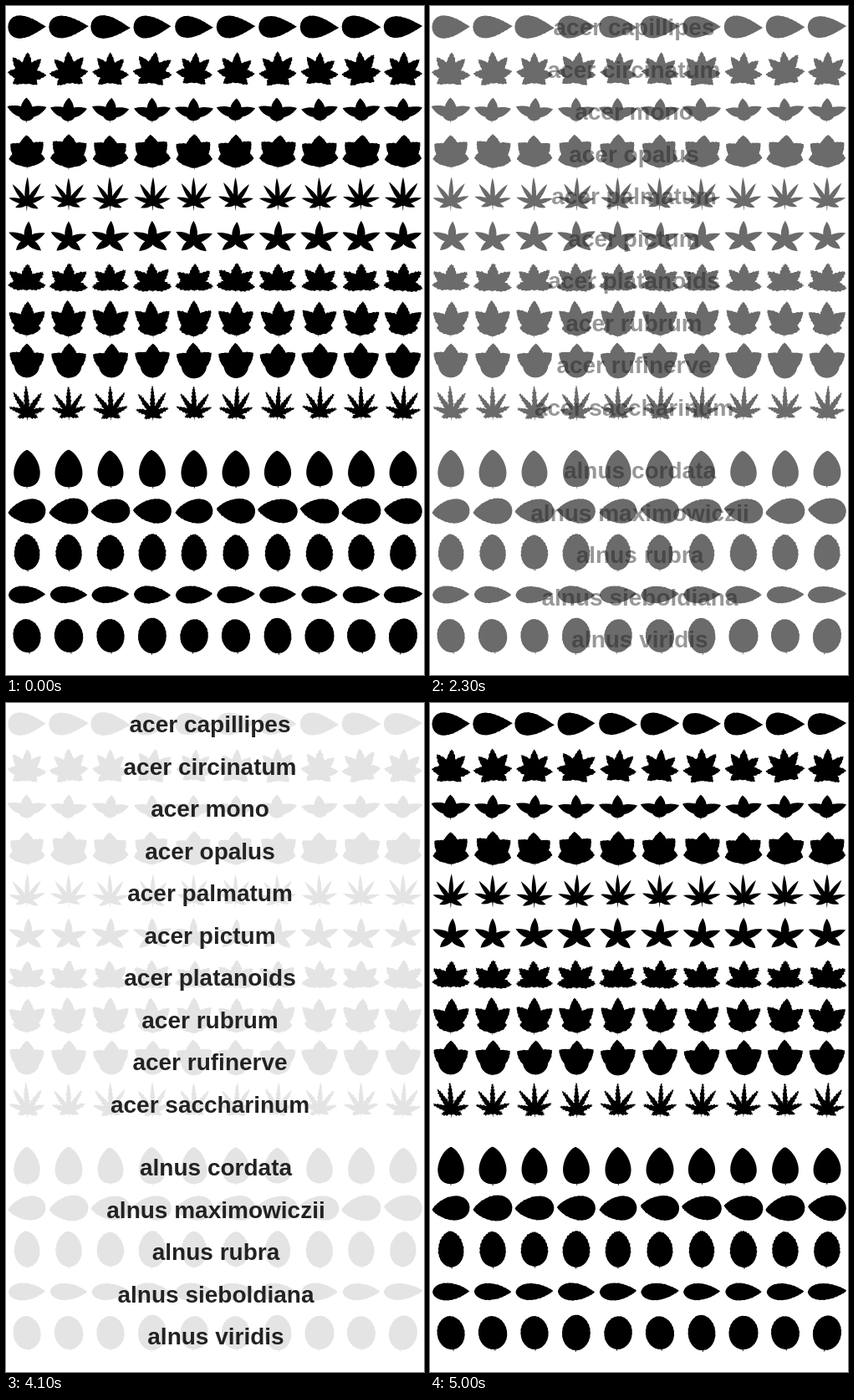
Animation of 500x800 px, one loop 6 s. Source, as an HTML page:

```html
<!DOCTYPE html>
<html lang="en">
<head>
<meta charset="utf-8">
<title>Leaf shapes</title>
<style>
  html, body { margin: 0; width: 100%; height: 100%; overflow: hidden; background: #fff; }
  svg { display: block; width: 100%; height: 100%; }
  text { font: bold 28px "Liberation Sans", Arial, sans-serif; fill: #222; text-anchor: middle; }
</style>
</head>
<body>
<svg viewBox="0 0 500 800">
  <path id="leaves"/>
  <g id="names" opacity="0"></g>
</svg>
<script>
const leaves = document.getElementById('leaves');
const names = document.getElementById('names');
let path = '';

let seed = 7;
const random = () => (seed = (seed * 16807) % 2147483647) / 2147483647;
const vary = size => (random() * 2 - 1) * size;

function turn([x, y], degrees) {
  const a = degrees * Math.PI / 180, cos = Math.cos(a), sin = Math.sin(a);
  return [x * cos - y * sin, x * sin + y * cos];
}

// A blade grows from its foot; its half width follows t^tip * (1 - t)^base, t = 0 at the tip.
function blade({ angle = 0, length, width, tip = .9, base = .5, teeth = 0, foot = 0 }) {
  const n = Math.max(10, Math.round(length * .6));
  const profile = t => t ** tip * (1 - t) ** base;
  const peak = profile(tip / (tip + base));
  const side = sign => Array.from({ length: n + 1 }, (_, k) => {
    const t = (1 - Math.cos(Math.PI * k / n)) / 2;
    const tooth = k % 2 && k < n ? teeth * (.5 + random()) : 0;
    const half = width / 2 * profile(t) / peak + tooth;
    return turn([sign * half, foot - (1 - t) * length - tooth], angle);
  });
  return [...side(1), ...side(-1).reverse()];
}

const disc = radius =>
  blade({ length: 2 * radius, width: 2 * radius, tip: .5, foot: radius });

// A leaf is a middle blade with pairs of side lobes, a round body and a stem.
function leaf(cx, cy, style) {
  const { w, h, facing = 0, sway = 3, pairs = 0, spread = 0, top = h, last = top,
          body = 0, stem = 0, lobe = w, tip, base, teeth } = style;
  const parts = [];
  for (let i = -pairs; i <= pairs; i++) {
    const part = Math.abs(i) / (pairs || 1);
    const loose = pairs ? 1 : 0;
    parts.push(blade({
      angle: spread * i / (pairs || 1) + vary(3) * loose,
      length: top - (top - last) * part ** 2 + vary(1) * loose,
      width: lobe, tip, base, teeth
    }));
  }
  if (body) parts.push(disc(body));
  if (stem) parts.push(blade({ angle: 180, length: stem, width: 1.2 }));

  const tilt = facing + vary(sway);
  const turned = parts.map(points => points.map(p => turn(p, tilt)));
  const fit = (n, size, middle) => {
    const values = turned.flat().map(p => p[n]);
    const low = Math.min(...values), high = Math.max(...values);
    return v => (middle + ((v - low) / (high - low) - .5) * size).toFixed(2);
  };
  const [wide, tall] = facing ? [h, w] : [w, h];
  const fx = fit(0, wide + vary(wide * .04), cx);
  const fy = fit(1, tall + vary(tall * .04), cy);
  for (const points of turned) {
    path += 'M' + points.map(([x, y]) => fx(x) + ' ' + fy(y)).join('L') + 'Z';
  }
}

function genus(prefix, labelX, labelY, leafY, kinds) {
  Object.entries(kinds).forEach(([name, style], row) => {
    for (let i = 0; i < 10; i++) leaf(25 + 50 * i, leafY + 50 * row, style);
    const label = document.createElementNS('http://www.w3.org/2000/svg', 'text');
    label.setAttribute('x', labelX);
    label.setAttribute('y', labelY + 50.5 * row);
    label.textContent = prefix + ' ' + name;
    names.append(label);
  });
}

genus('acer', 244, 35, 25, {
  capillipes: { w: 27, h: 46, facing: 90, tip: 1.1, teeth: .2 },
  circinatum: { w: 45, h: 40, pairs: 3, spread: 128, top: 25, last: 17, lobe: 11, body: 10, teeth: .5, sway: 7 },
  mono: { w: 45, h: 30, pairs: 1, spread: 68, top: 22, last: 24, lobe: 13, body: 9, stem: 12 },
  opalus: { w: 44, h: 42, pairs: 2, spread: 98, top: 28, last: 22, lobe: 21, body: 14, stem: 17, teeth: .3 },
  palmatum: { w: 43, h: 40, pairs: 3, spread: 112, top: 31, last: 16, lobe: 6, body: 4, stem: 10 },
  pictum: { w: 44, h: 35, pairs: 2, spread: 130, top: 24, last: 19, lobe: 9, body: 5 },
  platanoids: { w: 45, h: 34, pairs: 2, spread: 95, top: 29, last: 23, lobe: 14, body: 8, stem: 10, teeth: .9 },
  rubrum: { w: 43, h: 44, pairs: 2, spread: 94, top: 33, last: 18, lobe: 17, body: 11, stem: 14, teeth: .5 },
  rufinerve: { w: 42, h: 44, pairs: 1, spread: 55, top: 29, last: 27, lobe: 21, body: 16, stem: 18, teeth: .3 },
  saccharinum: { w: 41, h: 42, pairs: 3, spread: 110, top: 35, last: 14, lobe: 6, body: 5, stem: 9, teeth: 1 }
});

genus('alnus', 251, 565, 554, {
  cordata: { w: 32, h: 45, tip: .7, base: .43, stem: 2 },
  maximowiczii: { w: 30, h: 46, facing: -90, tip: .8, teeth: .3, sway: 7 },
  rubra: { w: 32, h: 45, tip: .6, teeth: .6, stem: 2 },
  sieboldiana: { w: 21, h: 45, facing: 90, base: .55, teeth: .3 },
  viridis: { w: 34, h: 43, tip: .52, teeth: .3, stem: 2, sway: 9 }
});

leaves.setAttribute('d', path);

// Cubic Bézier easing (.25, .1, .25, 1), solved by bisection.
function ease(x) {
  const bezier = (a, b, s) => 3 * a * s * (1 - s) ** 2 + 3 * b * s * s * (1 - s) + s ** 3;
  let low = 0, high = 1;
  for (let i = 0; i < 20; i++) {
    const mid = (low + high) / 2;
    if (bezier(.25, .25, mid) < x) low = mid; else high = mid;
  }
  return bezier(.1, 1, low);
}

function reveal(ms) {
  if (ms < 2000 || ms >= 5000) return 0;
  if (ms < 3000) return ease((ms - 1925) / 1350);
  if (ms < 4100) return 1;
  return (1 + Math.cos(Math.PI * Math.min(1, (ms - 4060) / 940))) / 2;
}

function draw(ms) {
  const shown = reveal(Math.floor(ms / 100) * 100);
  const grey = Math.round(229 * shown);
  leaves.setAttribute('fill', `rgb(${grey},${grey},${grey})`);
  names.setAttribute('opacity', shown.toFixed(3));
}

const start = performance.now();
function frame() {
  draw((performance.now() - start) % 6000);
  requestAnimationFrame(frame);
}
frame();
</script>
</body>
</html>
```
